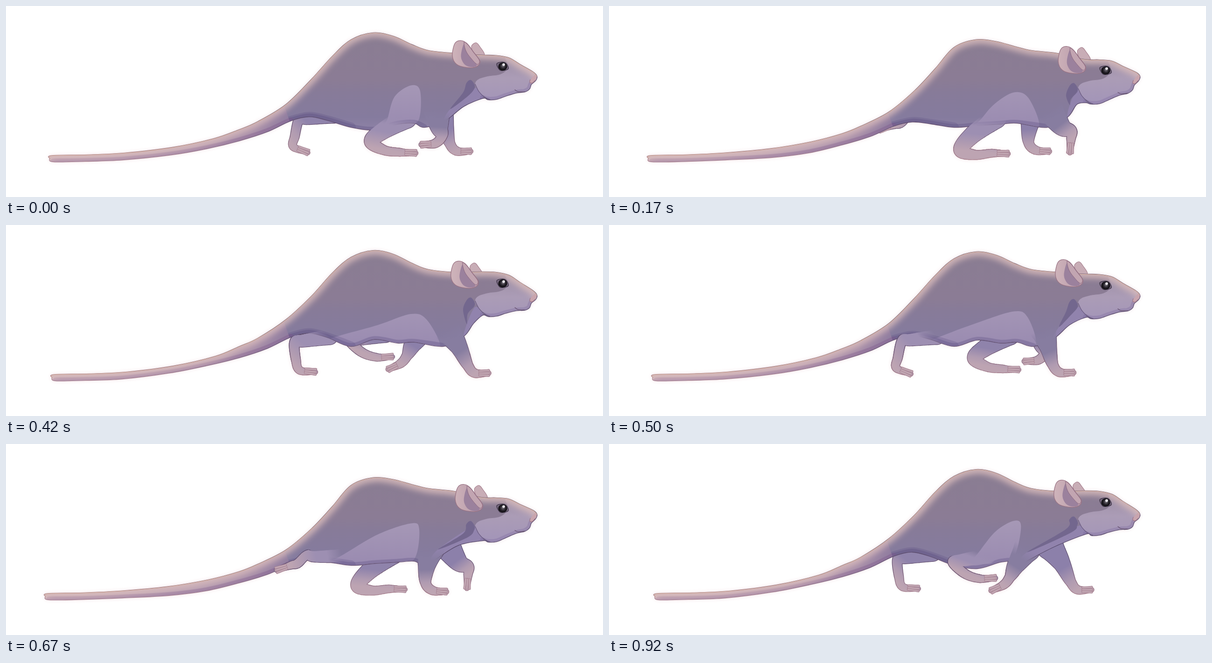
Recreate the animation shown at these times as an HTML page with a canvas. Size 1280 by 410 pixels, loop 1010 ms.

```html
<!DOCTYPE html>
<html lang="en">
<head>
<meta charset="utf-8">
<title>Walking rat</title>
<style>
html, body { margin: 0; width: 100%; height: 100%; overflow: hidden; background: #fff; }
canvas { display: block; }
</style>
</head>
<body>
<canvas id="stage" width="1280" height="410"></canvas>
<script>
const ctx = document.getElementById('stage').getContext('2d');
const LOOP = 1010, STRIDE = 12;
const starts = [0, 80, 170, 250, 330, 420, 500, 580, 670, 750, 830, 920];

// Key moments of a stride; everything else in a leg follows from these.
const hindKeys = { // heel x/y, ball x/y, toe angle
  0: [783, 291, 845, 314, 3],
  2: [754, 309, 822, 316, 2],
  4: [668, 270, 717, 314, 7],
  5: [619, 252, 630, 312, 6],
  7: [638, 244, 602, 302, 38],
  8: [645, 238, 612, 260, 162],
  10: [712, 230, 675, 288, 160],
  11: [738, 254, 795, 289, -2]
};
const foreKeys = { // wrist x/y, toe angle
  0: [935, 278, 175],
  2: [992, 268, 95],
  4: [1005, 288, 30],
  5: [990, 301, 0],
  7: [913, 298, 2],
  10: [873, 296, 13],
  11: [860, 285, 155]
};

const wave = (step, peak, period) => Math.cos((step - peak) * 2 * Math.PI / period);
const mix = (a, b, t) => a + (b - a) * t;
const polar = (length, degrees) => [length * Math.cos(degrees * Math.PI / 180), length * Math.sin(degrees * Math.PI / 180)];
const shift = (pts, dx, dy) => pts.map(([x, y]) => [x + dx, y + dy]);

function poseAt(keys, step) {
  const wrap = i => (i + STRIDE) % STRIDE;
  let before = 0, after = 1;
  while (!keys[wrap(step - before)]) before++;
  while (!keys[wrap(step + after)]) after++;
  const to = keys[wrap(step + after)];
  return keys[wrap(step - before)].map((v, i) => mix(v, to[i], before / (before + after)));
}

function hindLeg(step) {
  const [hx, hy, bx, by, angle] = poseAt(hindKeys, step);
  const thick = Math.min(1, Math.max(.6, .65 + (hy - 240) / 150));
  const [tx, ty] = polar(34, angle);
  return {
    joints: [[hx + 75, 240], [hx + 25 * thick, mix(hy, 245, .5)], [hx, hy],
      [mix(hx, bx, .5) - 3, mix(hy, by, .5) + 7], [bx, by], [bx + tx, by + ty]],
    radii: [23 * thick, 18 * thick, 14.5 * thick, 9.5, 8, 4]
  };
}
function foreLeg(step) {
  const [wx, wy, angle] = poseAt(foreKeys, step);
  const elbow = 925 + .75 * (wx - 930), [tx, ty] = polar(30, angle);
  const ball = [wx + tx / 2, wy + 17];
  return {
    joints: [[mix(920, elbow, .5), 224], [elbow, 260], [wx, wy], ball, [ball[0] + tx, ball[1] + ty]],
    radii: [29, 18, 10.5, 9, 4.5]
  };
}

// Smooth path through points
function curve(pts, closed) {
  const path = new Path2D(), n = pts.length;
  const at = i => closed ? pts[(i + n) % n] : pts[Math.max(0, Math.min(n - 1, i))];
  path.moveTo(...pts[0]);
  for (let i = 0; i < (closed ? n : n - 1); i++) {
    const [p, q, r, s] = [at(i - 1), at(i), at(i + 1), at(i + 2)];
    path.bezierCurveTo(q[0] + (r[0] - p[0]) / 6, q[1] + (r[1] - p[1]) / 6,
      r[0] - (s[0] - q[0]) / 6, r[1] - (s[1] - q[1]) / 6, r[0], r[1]);
  }
  if (closed) path.closePath();
  return path;
}
function paint(path, fill, line, width = 1.2) {
  if (fill) { ctx.fillStyle = fill; ctx.fill(path); }
  if (line) { ctx.strokeStyle = line; ctx.lineWidth = width; ctx.stroke(path); }
}
function gradient(x0, y0, x1, y1, ...stops) {
  const g = ctx.createLinearGradient(x0, y0, x1, y1);
  for (const [at, color] of stops) g.addColorStop(at, color);
  return g;
}
const outline = gradient(0, 220, 0, 325, [0, '#574a6c'], [.45, '#65506f'], [1, '#a47b89']);

// Tapered limb as a run of discs along a spline
function limb({ joints, radii }, from, grow, color) {
  ctx.beginPath();
  const last = joints.length - 1;
  for (let t = from; t <= last + .001; t += .04) {
    const i = Math.min(last - 1, Math.floor(t)), u = t - i;
    const [p, q, r, s] = [-1, 0, 1, 2].map(d => joints[Math.max(0, Math.min(last, i + d))]);
    const axis = k => q[k] + u * (r[k] - p[k] + u * (2 * p[k] - 5 * q[k] + 4 * r[k] - s[k]
      + u * (3 * (q[k] - r[k]) + s[k] - p[k]))) / 2;
    const x = axis(0), y = axis(1), radius = mix(radii[i], radii[i + 1], u) + grow;
    ctx.moveTo(x + radius, y);
    ctx.arc(x, y, radius, 0, 7);
  }
  ctx.fillStyle = color;
  ctx.fill();
}
function toes([bx, by], [tx, ty]) {
  const dx = tx - bx, dy = ty - by, len = Math.hypot(dx, dy), nx = -dy / len, ny = dx / len;
  ctx.lineCap = 'round';
  for (const off of [-4.5, 0, 4]) {
    const toe = curve([.35, .75, 1].map((t, i) => {
      const spread = off * (1 + .15 * i);
      return [bx + dx * t + nx * spread, by + dy * t + ny * spread];
    }));
    paint(toe, null, '#a27d8e', 5.2);
    paint(toe, null, '#c1a6b2', 3.6);
  }
}
// Tint is an "r,g,b" triple; a fading leg melts into the body at its root.
function drawLeg(leg, tint, outlineFrom, fade) {
  const { joints } = leg, ball = joints.at(-2);
  limb(leg, outlineFrom, 1.2, outline);
  limb(leg, 0, 0, gradient(...joints[0], ...ball, [0, `rgba(${tint},${fade ? 0 : 1})`],
    [.28, `rgb(${tint})`], [.5, `rgb(${tint})`], [.8, '#b09bb1'], [1, '#bda4b2']));
  toes(ball, joints.at(-1));
}

function drawEye(x, y) {
  paint(curve([[x - 13, y - 5], [x - 6, y - 9], [x + 4, y - 9], [x + 10, y - 3], [x + 12, y + 5],
    [x + 5, y + 8], [x - 6, y + 8]], true), '#77697f', '#3b3244', 1.3);
  const ball = ctx.createRadialGradient(x + 1, y - 2, 1, x, y, 9.5);
  ball.addColorStop(0, '#77737b'); ball.addColorStop(.5, '#29252d'); ball.addColorStop(1, '#08060a');
  ctx.fillStyle = ball;
  ctx.beginPath(); ctx.ellipse(x, y, 9.5, 8.8, 0, 0, 7); ctx.fill();
  ctx.fillStyle = '#eeeaf0';
  ctx.beginPath(); ctx.arc(x + 2, y - 4, 2.8, 0, 7); ctx.fill();
}

// Pale patch that runs from the knee back to the moving shank
function flank(step, shank) {
  const peak = 178 + 15 * wave(step, 4, STRIDE);
  const front = 900 + 38 * wave(step, 3.8, STRIDE);
  const rear = 812 + 22 * wave(step, .5, STRIDE);
  return curve([[868, peak], [883 + .3 * (front - 868), peak + 12], [front, 240 + .3 * (front - 868)],
    [front - 35, 262], [mix(shank, front, .5), 275], [shank, 268],
    [mix(rear, shank, .6), 242], [rear, peak + 24]], true);
}

function draw(step) {
  // The trunk bobs twice per stride; rump, tail and head follow with a sharper beat.
  const bob = wave(step, 2.2, 6), beat = bob ** 3;
  const tip = 92 - 7.5 * beat, drop = 2 + 7.5 * beat;
  const earX = -2.5 + 5 * beat, earY = 7 + 8 * wave(step, 2.9, 6);

  const near = { hind: hindLeg(step), fore: foreLeg(step) };
  const far = { hind: hindLeg(step + STRIDE / 2), fore: foreLeg(step + STRIDE / 2) };
  const elbow = near.fore.joints[1][0], shank = near.hind.joints[1][0];
  const head = pts => pts.map(([x, y]) => [x, y + drop * Math.min(1, (1138 - x) / 80)]);

  const top = [
    [tip, 327], [tip + 5, 321.5], [tip + 80, 320], [tip + 160, 316],
    [tip + 260, 305 + 2 * beat], [tip + 350, 287 + 5 * beat], [500, 268 + 7 * beat],
    [540, 251 + 8 * beat], [600, 216 + 13 * beat], [655, 168 + 15 * bob], [700, 119 + 16 * bob],
    [740, 79.5 + 10 * bob], [787, 64 + 9 * bob], [830, 70 + 7 * bob], [870, 85 + 2.5 * bob],
    [905, 96], [960, 102],
    ...head([[1018, 106], [1050, 107], [1078, 112], [1102, 126], [1130, 142], [1138, 151]])];
  const jaw = head([[1135, 160], [1126, 168], [1122, 178], [1112, 184], [1095, 186],
    [1072, 193], [1052, 200], [1034, 201], [1022, 198]]);
  const breast = [elbow + 12, 246 - .2 * (elbow - 929)];
  const throat = [mix(breast[0], 1022, .5), mix(breast[1], 198, .5) - 7];
  const belly = [[610, 249 + 9 * beat], [650, 240 + 9 * beat], [690, 247 + 6 * beat], [740, 260],
    [790, 256 + 11 * wave(step, 11, STRIDE)], [840, 253], [875, 251], [Math.max(895, elbow - 32), 260]];
  const tailUnder = [[560, 272 + 8 * beat], [500, 291 + 7 * beat], [430, 308 + 7 * beat],
    [350, 321 + 4 * beat], [250, 330], [170, 333], [tip + 8, 334]];
  const trunk = curve([...top, ...jaw, throat, breast, ...belly.slice().reverse(), ...tailUnder], true);
  const back = curve(top);

  ctx.fillStyle = '#fff';
  ctx.fillRect(0, 0, 1280, 410);
  ctx.lineJoin = 'round';

  // Soft halo
  ctx.save();
  ctx.shadowColor = 'rgba(225,180,190,.5)';
  ctx.shadowBlur = 10;
  paint(trunk, '#8d7e9b');
  limb(near.hind, 1, 0, '#bda4b2');
  limb(near.fore, 1, 0, '#bda4b2');
  ctx.restore();

  ctx.save();
  ctx.translate(0, -5);
  drawLeg(far.hind, '143,131,171', 0);
  drawLeg(far.fore, '140,128,170', 0);
  ctx.restore();

  const ear = (pts, dx = earX, dy = earY) => curve(shift(pts, dx, dy), true);
  paint(ear([[1003, 90], [1007, 82], [1014, 80], [1021, 88], [1031, 106], [1012, 112]],
    earX - 1, earY * .8), '#c8adb6', '#a98391');

  drawLeg(near.hind, '157,143,178', 0);
  drawLeg(near.fore, '135,125,160', 0);
  paint(trunk, null, outline, 2.6);
  paint(trunk, gradient(0, 55, 0, 285, [0, '#8a7d92'], [.45, '#8b7c95'], [.57, '#877b99'],
    [.8, '#857b9e'], [1, '#9487ac']));

  ctx.save();
  ctx.clip(trunk);
  paint(flank(step, shank), gradient(0, 165, 0, 270, [0, '#a698b6'], [1, '#9889b0']));
  paint(curve(belly), null, 'rgba(82,68,122,.28)', 13);
  paint(curve(belly.slice(0, 4)), null, 'rgba(82,68,122,.22)', 20);

  // Tail
  const tail = new Path2D(`M0 0H590L597 ${218 + 8 * beat}L611 ${258 + 8 * beat}V410H0Z`);
  paint(tail, gradient(95, 0, 612, 0, [0, '#c9afba'], [.6, '#b9a0b3'], [.85, '#a78ea9'], [1, '#8f7c9f']));
  paint(curve([belly[0], ...tailUnder]), null, 'rgba(125,88,140,.36)', 14);

  // Throat and neck shadow
  const neck = [Math.min(988, breast[0] + 12), breast[1] - 25];
  paint(curve([[1006, 176], neck, breast, throat, jaw.at(-1)], true), '#9183ad');
  paint(curve([...shift([[990, 194], [1004, 178], [1004, 168], [996, 159], [987, 166], [980, 186]], 0, drop * .7),
    neck], true), '#73678e');

  // Muzzle
  paint(curve(head([[1006, 166], [1014, 157], [1034, 151], [1056, 148], [1070, 141], [1076, 128], [1071, 108],
    [1104, 124], [1140, 148], [1136, 166], [1118, 190], [1050, 203], [1026, 194], [1010, 178]]), true),
    gradient(0, 110, 0, 200, [0, '#9e90a6'], [.5, '#ab9cb6'], [1, '#a496b8']));
  paint(curve(jaw), null, 'rgba(105,82,145,.22)', 12);
  ctx.filter = 'blur(7px)';
  paint(back, null, '#d8bbbb', 15);
  ctx.filter = 'none';
  paint(curve(head([[1128, 154], [1138, 146], [1142, 154], [1130, 166], [1123, 164]]), true), '#c9a5ae');
  ctx.restore();

  paint(curve(head([[1124, 158], [1123, 164], [1129, 165], [1134, 160]])), null, '#9a7182', 1.1);
  paint(curve(head([[1091, 180], [1098, 184], [1112, 184]])), null, '#66516d');
  paint(curve(head([[1006, 168], [1014, 184], [1026, 196], [1038, 201]])), null, '#65567a', 1.1);
  paint(back, null, '#d2aea1', 1.5);

  drawLeg(near.hind, '157,143,178', 1.8, true);
  drawLeg(near.fore, '135,125,160', 1.5, true);

  paint(ear([[966, 82], [978, 75], [992, 81], [1006, 99], [1020, 119], [1013, 131], [992, 133], [970, 126], [961, 108]]),
    gradient(960, 0, 1022, 0, [0, '#cdb2b9'], [1, '#b596a8']), '#9a7485', 1.3);
  paint(ear([[987, 82], [981, 97], [980, 113], [988, 127], [1001, 132], [1013, 129], [1007, 117], [994, 103]]), '#9b819d');
  paint(ear([[986, 79], [995, 85], [1006, 100], [1019, 118], [1014, 126], [1000, 112], [990, 97]]), '#c2a5b1', '#8c6980', 1);

  drawEye(1065, 130 + drop * .92);
}

function tick() {
  const now = performance.now() % LOOP;
  draw(starts.findLastIndex(start => start <= now));
  requestAnimationFrame(tick);
}
tick();
</script>
</body>
</html>
```
